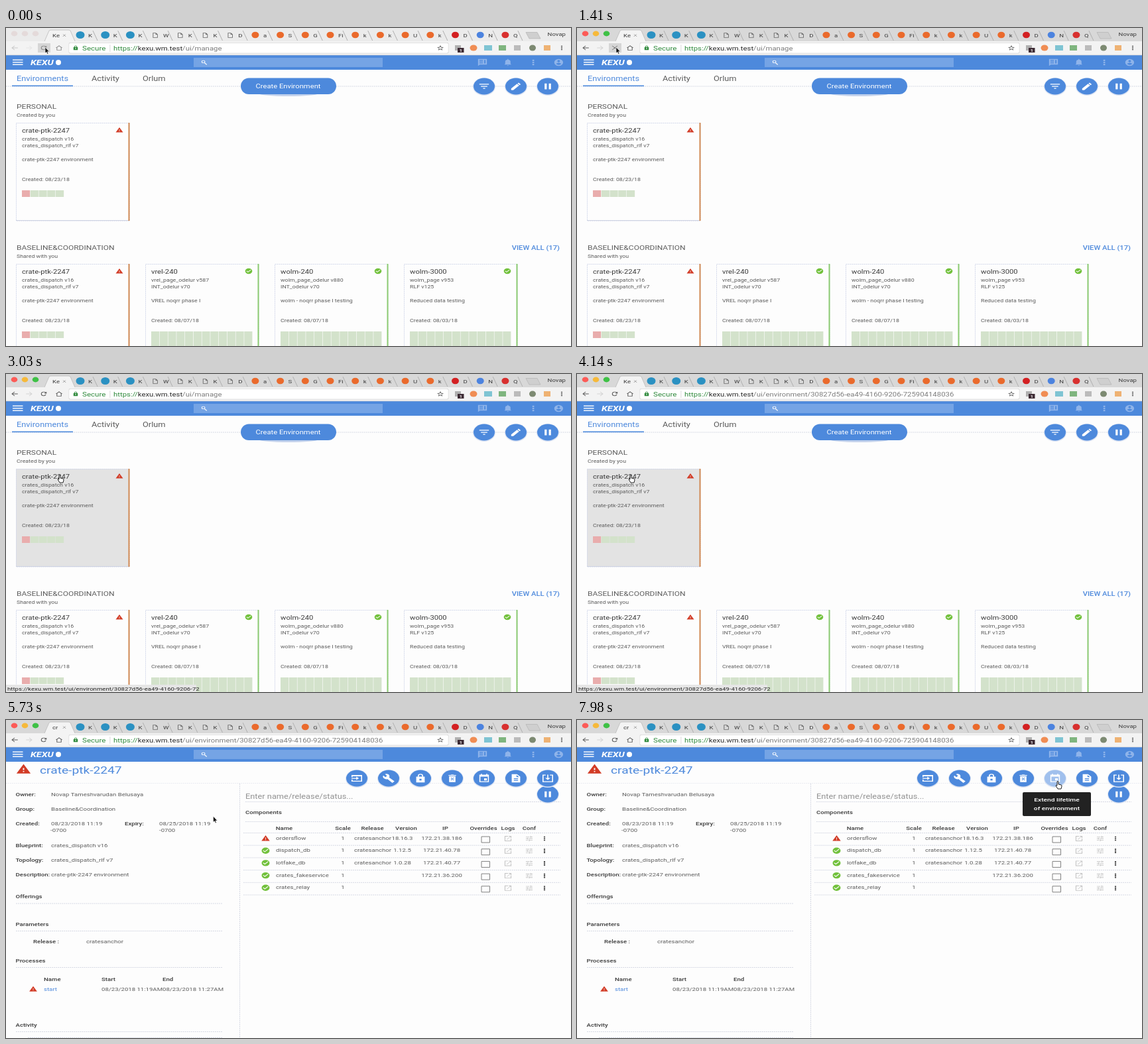
These frames come from a looping animation (852x480 px, 8000 ms). An HTML page with a canvas:

```html
<!DOCTYPE html>
<html lang="en">
<head>
<meta charset="utf-8">
<title>Environment manager</title>
<style>
html, body { margin: 0; width: 100%; height: 100%; overflow: hidden; background: #fdfdfd; }
canvas { display: block; width: 100vw; height: 100vh; }
</style>
</head>
<body>
<canvas width="852" height="480"></canvas>
<script>
const ctx = document.querySelector('canvas').getContext('2d');
const LOOP = 8000;
const SX = 0.8, SY = 0.625;
const PAGE = '#fdfdfd', BAR = '#f3f3f3', BLUE = '#4d89dc', LINE = '#d6d9e4', WHITE = '#ffffff';
const INK = '#3b3b3b', SOFT = '#5c5c5c', MUTED = '#929292', FAINT = '#c4c4c4', GREEN = '#72c13c', RED = '#d23b26';

const BASE = 'https://', HOST = 'kexu.wm.test';
const LIST_PATH = '/ui/manage';
const ENV_PATH = '/ui/environment/30827d56-ea49-4160-9206-725904148036';

const ICONS = {
  filter: 'M3 6h18v2H3zM6 11h12v2H6zM10 16h4v2h-4z',
  edit: 'M3 17v4h4L18 10l-4-4zM15 5l4 4 2-2-4-4z',
  pause: 'M6 5h4v14H6zM14 5h4v14h-4z',
  enter: 'M2 4h20v16H2v-5h2v3h16V7H4v2H2zM2 11h9V8l5 4-5 4v-3H2z',
  wrench: 'M23 19L13 10Q15 5 11 2 8 0 5 2l4 4-3 3-4-4Q0 8 3 12q3 3 7 2l9 9z',
  lock: 'M4 8h3V6Q7 1 12 1t5 5v2h3v14H4zM9 8h6V6q0-3-3-3T9 6zM10 13h4v4h-4z',
  bin: 'M6 7h12v14H6zM5 4h4l1-1h4l1 1h4v2H5zM9 11l1-1 5 6-1 1zM14 10l1 1-5 6-1-1z',
  event: 'M3 3h3V1h2v2h8V1h2v2h3v18H3zM5 8v11h14V8zM12 12h5v5h-5z',
  doc: 'M4 2h10l6 6v14H4zM8 12v2h8v-2zM8 16v2h8v-2zM13 4v5h5z',
  download: 'M2 3h6v2H4v14h16V5h-4V3h6v18H2zM11 3h2v8h4l-5 5-5-5h4z',
  warn: 'M1 21h22L12 2zM11 10h2v4h-2zM11 16h2v2h-2z',
  check: 'M2 12a10 10 0 1 0 20 0 10 10 0 1 0-20 0M5 12l1.5-1.5L10 14l7.5-7.5L19 8l-9 9z',
  search: 'M3 9a6 6 0 1 0 12 0 6 6 0 1 0-12 0M5 9a4 4 0 1 1 8 0 4 4 0 1 1-8 0M14 13l7 7-2 2-7-7z',
  open: 'M3 3h9v2H5v14h14v-7h2v9H3zM14 3h7v7h-2V6l-10 10-1-1L18 5h-4z',
  tune: 'M3 5h10v2H3zM15 3h2v2h4v2h-4v2h-2zM3 11h4V9h2v6H7v-2H3zM11 11h10v2H11zM3 17h6v2H3zM11 15h2v2h8v2h-8v2h-2z',
  more: 'M10 4h4v4h-4zM10 10h4v4h-4zM10 16h4v4h-4z',
  reload: 'M18 6l2-2v7h-7l3-3Q12 4 8 8t0 8 9-2h2Q17 20 12 20 4 20 4 12t8-8q4 0 6 2z',
  stop: 'M4 5l1-1 7 7 7-7 1 1-7 7 7 7-1 1-7-7-7 7-1-1 7-7z',
  home: 'M12 3l10 9h-3v9H5v-9H2zM12 6l-5 4v9h10v-9z',
  back: 'M21 11v2H7l6 6-2 1-8-8 8-8 2 1-6 6z',
  forward: 'M3 11v2h14l-6 6 2 1 8-8-8-8-2 1 6 6z',
  star: 'M12 2l3 7 7 .5-5.500 4.500 2 7.500-6.500-4-6.500 4 2-7.500L2 9.500 9 9zM12 7l-2 4-4 .5 3 2.500-1 4 4-2.500 4 2.500-1-4 3-2.500-4-.5z',
  file: 'M4 2h10l6 6v14H4zM6 4v16h12V9h-5V4z',
  chat: 'M2 2h20v16H6l-4 4zM5 5v2h8V5zM5 9v2h8V9zM5 13v2h8v-2zM16 5v10h3V5z',
  bell: 'M4 18l2-2v-6q0-5 5-6V2h2v2q5 1 5 6v6l2 2zM10 20h4l-2 2z',
  person: 'M2 12a10 10 0 1 0 20 0 10 10 0 1 0-20 0M9 8a3 3 0 1 0 6 0 3 3 0 1 0-6 0M6 16q6-6 12 0-6 6-12 0z'
};
for (const name in ICONS) ICONS[name] = new Path2D(ICONS[name]);

function rect(x, y, w, h, color) { ctx.fillStyle = color; ctx.fillRect(x, y, w, h); }

function text(str, x, y, size, color = SOFT, { weight = 400, align = 'left', style = '' } = {}) {
  ctx.save();
  ctx.translate(x, y + size * 0.355 * SY);
  ctx.scale(SX, SY);
  ctx.font = `${style} ${weight} ${size}px Roboto, sans-serif`;
  ctx.textAlign = align;
  ctx.fillStyle = color;
  ctx.fillText(str, 0, 0);
  const width = ctx.measureText(str).width * SX;
  ctx.restore();
  return width;
}
const bold = (str, x, y, align) => text(str, x, y, 12, INK, { weight: 500, align });

function icon(name, x, y, size, color) {
  ctx.save();
  ctx.translate(x, y);
  ctx.scale(size * SX / 24, size * SY / 24);
  ctx.translate(-12, -12);
  ctx.fillStyle = color;
  ctx.fill(ICONS[name], 'evenodd');
  ctx.restore();
}

function oval(x, y, rx, ry, color) {
  ctx.fillStyle = color;
  ctx.beginPath();
  ctx.ellipse(x, y, rx, ry, 0, 0, 7);
  ctx.fill();
}

function roundRect(x, y, w, h, r, color) {
  ctx.fillStyle = color;
  ctx.beginPath();
  ctx.roundRect(x, y, w, h, r);
  ctx.fill();
}

function path(d, fill, stroke, width = 1) {
  const p = new Path2D(d);
  if (fill) { ctx.fillStyle = fill; ctx.fill(p); }
  if (stroke) { ctx.strokeStyle = stroke; ctx.lineWidth = width; ctx.stroke(p); }
}

function dotted(x1, y1, x2, y2, color = LINE) {
  ctx.setLineDash([2, 1]);
  path(`M${x1} ${y1}L${x2} ${y2}`, null, color);
  ctx.setLineDash([]);
}

function button(name, x, y, color = BLUE) {
  oval(x, y + 0.5, 17, 13.5, '#dbe3f3');
  oval(x, y, 16, 12.5, color);
  icon(name, x, y, 24, WHITE);
}

// ---- Browser frame ----
const TAB_LABELS = 'K K K W K K D a S G Fi k k U k D N Q'.split(' ');

function tabMark(i, x) {
  if (i > 2 && i < 7) return icon('file', x, 11, 14, '#6a6a6a');
  const color = i < 3 ? '#2b91c2' : i < 15 ? '#ea6a2c' : ['#d32022', '#4c83df', '#d8302f'][i - 15];
  oval(x, 10.5, i < 3 ? 6.5 : 5.5, i < 3 ? 5.5 : 4.8, color);
}

function browser({ title, url, loading, reloadHover, focused }) {
  const strip = focused ? '#d8d8d8' : '#ebebeb';
  const iconColor = focused ? '#5c5c5c' : '#8c8c8c';
  const lights = focused ? ['#fc5b57', '#f6b93a', '#3fc146'] : ['#e4dada', '#e4dada', '#e4dada'];
  rect(0, 0, 852, 20, strip);
  lights.forEach((c, i) => oval(12.5 + 16 * i, 8.5, 4.8, 3.9, c));
  TAB_LABELS.forEach((label, i) => {
    const x = 112 + 37.7 * i;
    path(`M${x + 19} 4L${x + 26} 19`, null, '#b0b0b0');
    tabMark(i, x);
    text(label, x + 12, 11, 12, INK);
  });
  path('M784 6.500H801L806 16H789Z', '#cfcfcf', '#b4b4b4', 0.7);
  text('Novap', 844, 9, 12, INK, { align: 'right' });

  rect(0, 20, 852, 21, BAR);
  path('M58 20.500L65 4Q66 3 68 3H94Q96 3 97 4L104 20.500Z', BAR);
  path('M58 20L65 4Q66 3 68 3H94Q96 3 97 4L104 20', null, '#bcbcbc', 0.8);
  text(title, 70, 11, 12, INK);
  icon('stop', 88, 11, 9, SOFT);

  if (reloadHover) rect(48, 23, 19, 14, '#d6d6d6');
  icon('back', 13, 30, 16, focused ? iconColor : '#c9c9c9');
  icon('forward', 35, 30, 16, focused ? '#d4d4d4' : '#e6e6e6');
  icon(loading ? 'stop' : 'reload', 57, 30, 16, iconColor);
  icon('home', 80, 30, 16, iconColor);

  roundRect(94.6, 22.1, 572.8, 16.3, 2, '#d5d5d5');
  roundRect(95.2, 22.8, 571.6, 14.9, 2, WHITE);
  icon('lock', 105, 30, 12, '#2f8a3c');
  text('Secure', 115, 30.5, 14.5, '#2f8a3c');
  rect(156.5, 25, 0.8, 11, '#cfcfcf');
  let x = 162;
  x += text(BASE, x, 30.5, 14.2, '#2f8a3c');
  x += text(HOST, x, 30.5, 14.2, '#2c2c2c');
  text(url, x, 30.5, 14.2, '#7c7c7c');
  icon('star', 655, 30, 15, '#5c5c5c');

  rect(677, 26, 9, 8, '#b0b0b0');
  rect(681, 30, 9.5, 7, '#3c2a33');
  text('1', 685.7, 33.6, 9, WHITE, { align: 'center', weight: 700 });
  oval(705, 30, 5.5, 4.5, '#f08d54');
  rect(721, 26, 12, 8, '#7fc4d3');
  rect(743, 26, 11, 8, '#7fb57f');
  rect(766, 26, 10, 8, '#bbbbbb');
  oval(794, 30, 5, 4.5, '#7d8a72');
  rect(811, 26, 10, 8, '#eeb273');
  icon('more', 838, 30, 16, '#5c5c5c');
  rect(0, 40.5, 852, 0.7, '#d2d2d2');
}

function appBar() {
  rect(0, 41, 852, 22, BLUE);
  for (const y of [47.5, 51, 54.5]) rect(10, y, 15.5, 1.4, WHITE);
  text('KEXU', 37, 52, 18, WHITE, { weight: 700, style: 'italic' });
  oval(79, 52, 4, 4, WHITE);
  rect(283, 45, 285, 14, '#75a4e5');
  icon('search', 299, 52, 14, WHITE);
  ['chat', 'bell', 'more', 'person'].forEach((name, i) =>
    icon(name, 718.5 + 38.3 * i, 52, 20, '#8fb4ea'));
}

// ---- Environment list ----
const ENV = 'crate-ptk-2247';
const MINE = { title: ENV, lines: ['crates_dispatch v16', 'crates_dispatch_rlf v7'], note: ENV + ' environment', date: '08/23/18', failed: true };
const SHARED = [
  MINE,
  { title: 'vrel-240', lines: ['vrel_page_odelur v587', 'INT_odelur v70'], note: 'VREL noqrr phase I', date: '08/07/18' },
  { title: 'wolm-240', lines: ['wolm_page_odelur v880', 'INT_odelur v70'], note: 'wolm - noqrr phase I testing', date: '08/07/18' },
  { title: 'wolm-3000', lines: ['wolm_page v953', 'RLF v125'], note: 'Reduced data testing', date: '08/03/18' }
];

function card(env, x, y, hover = 0) {
  const { failed } = env;
  rect(x, y, 171, 148, PAGE);
  ctx.globalAlpha = hover;
  rect(x, y, 171, 148, '#e3e3e3');
  ctx.globalAlpha = 1;
  ctx.setLineDash([2, 1]);
  path(`M${x + .5} ${y + .5}h170.500v147.500h-170.500z`, null, '#d3d8ea');
  ctx.setLineDash([]);
  rect(x, y + 147, 171, 1, '#cdd2e2');
  rect(x + 169.5, y, 2, 148, failed ? '#d18a55' : '#8ccb72');
  const left = x + 9;
  text(env.title, left, y + 12, 14, INK);
  env.lines.forEach((line, i) => text(line, left, y + 24.5 + 10 * i, 11));
  text(env.note, left, y + 55.5, 11);
  text('Created: ' + env.date, left, y + 85.5, 11);
  icon(failed ? 'warn' : 'check', x + 156, y + 11, failed ? 15 : 16, failed ? RED : GREEN);
  const cells = failed ? 5 : 12, step = 12.75;
  for (let i = 0; i < cells; i++) {
    rect(left + step * i, y + 102, step - 0.6, failed ? 10 : 22, failed && i === 0 ? '#e9adad' : '#d3e2cb');
  }
}

function listPage(hover, showContent) {
  appBar();
  dotted(0, 88, 852, 88);
  text('Environments', 16, 76, 16, BLUE);
  text('Activity', 129, 76, 16, SOFT);
  text('Orlum', 206, 76, 16, SOFT);
  rect(9, 86.5, 92, 1.6, BLUE);
  oval(426, 99, 45, 4, '#c3d2ec');
  roundRect(354, 75.5, 144, 24.5, 14, BLUE);
  text('Create Environment', 425.5, 88, 14, WHITE, { align: 'center' });
  ['filter', 'edit', 'pause'].forEach((name, i) => button(name, 721 + 48 * i, 88));
  if (!showContent) return;
  text('PERSONAL', 16, 119, 15);
  text('Created by you', 16, 131.5, 11);
  card(MINE, 15, 143, hover);
  text('BASELINE&COORDINATION', 16, 332, 15);
  text('Shared with you', 16, 344.5, 11);
  text('VIEW ALL (17)', 835, 332, 14, BLUE, { align: 'right', weight: 500 });
  SHARED.forEach((env, i) => card(env, 15 + 195 * i, 356));
}

// ---- Environment details ----
const FIELDS = [
  ['Owner:', 112, 'Novap Tameshvarudan Belusaya'],
  ['Group:', 134, 'Baseline&Coordination'],
  ['Created:', 156, '08/23/2018 11:19'],
  ['Blueprint:', 189, 'crates_dispatch v16'],
  ['Topology:', 211, 'crates_dispatch_rlf v7'],
  ['Description:', 233.5, ENV + ' environment']
];
const COMPONENTS = [
  ['ordersflow', 'cratesanchor', '18.16.3', '172.21.38.186'],
  ['dispatch_db', 'cratesanchor', '1.12.5', '172.21.40.78'],
  ['lotfake_db', 'cratesanchor', '1.0.28', '172.21.40.77'],
  ['crates_fakeservice', '', '', '172.21.36.200'],
  ['crates_relay', '', '', '']
];
const HEADS = { Name: 419.5, Scale: 508, Release: 552.5, Version: 603.5, IP: 662.5, Overrides: 720, Logs: 757, Conf: 789 };

function detailsLeft() {
  for (const [label, y, value] of FIELDS) {
    bold(label, 14.5, y);
    text(value, 68, y, 12);
  }
  bold('Expiry:', 179, 156);
  text('08/25/2018 11:19', 231, 156, 12);
  text('-0700', 67, 166.5, 12);
  text('-0700', 231, 166.5, 12);
  [['Offerings', 266.5], ['Parameters', 308], ['Processes', 363], ['Activity', 460]].forEach(([label, y]) => {
    bold(label, 14.5, y);
    dotted(15, y + 10.5, 327, y + 10.5);
  });
  bold('Release :', 41, 334.5);
  text('cratesanchor', 121, 334.5, 12);
  bold('Name', 57, 391);
  bold('Start', 144, 391);
  bold('End', 236, 391);
  icon('warn', 41, 406, 16, RED);
  text('start', 57, 406.5, 12, BLUE);
  text('08/23/2018 11:19AM', 144, 406.5, 12);
  text('08/23/2018 11:27AM', 236, 406.5, 12);
  dotted(33, 479.5, 327, 479.5);
}

function detailsRight() {
  text('Enter name/release/status...', 361, 115, 16, MUTED);
  dotted(361, 123.5, 836, 123.5);
  bold('Components', 361, 139.5);
  dotted(361, 153.5, 836, 153.5);
  for (const label in HEADS) bold(label, HEADS[label], 163, 'center');
  COMPONENTS.forEach(([name, release, version, ip], i) => {
    const y = 178 + 18.7 * i;
    const center = { align: 'center' };
    dotted(358, y - 7.5, 836, y - 7.5);
    icon(i ? 'check' : 'warn', 391.5, y + 0.5, i ? 18 : 17, i ? GREEN : RED);
    text(name, 407, y, 12);
    text('1', 508, y, 12, SOFT, center);
    text(release, 525, y, 12);
    text(version, 597.5, y, 12, SOFT, center);
    text(ip, 657, y, 12, SOFT, center);
    path(`M717 ${y - 2}h12.500v9h-12.500z`, null, '#808080');
    icon('open', 757, y + 1, 17, FAINT);
    icon('tune', 789, y + 1, 17, FAINT);
    icon('more', 812, y + 1, 16, INK);
  });
  dotted(358, 264, 836, 264);
}

function detailsPage(buttonHover, tooltip) {
  appBar();
  icon('warn', 26.5, 74, 29, RED);
  text(ENV, 51, 75.5, 24, BLUE);
  dotted(0, 95.5, 852, 95.5, '#eaecf2');
  dotted(352.5, 96, 352.5, 480);
  detailsLeft();
  detailsRight();
  button('pause', 817, 112);
  ['enter', 'wrench', 'lock', 'bin', 'event', 'doc', 'download'].forEach((name, i) =>
    button(name, 529 + 48 * i, 88, buttonHover && name === 'event' ? '#a0c0ed' : BLUE));
  if (tooltip <= 0) return;
  ctx.globalAlpha = tooltip;
  roundRect(672, 109, 103, 36, 2, '#222222');
  const style = { align: 'center', weight: 500 };
  text('Extend lifetime', 723.5, 120, 12.8, WHITE, style);
  text('of environment', 723.5, 133, 12.8, WHITE, style);
  ctx.globalAlpha = 1;
}

// ---- Pointer ----
const MOVES = [
  [0, 59, 29], [1500, 59, 29], [2150, 163, 121], [2350, 163, 121], [2900, 82, 153],
  [4900, 82, 153], [6600, 559, 137], [6900, 559, 137], [7500, 726, 93], [LOOP, 726, 93]
];
const clamp = v => Math.max(0, Math.min(1, v));

function pointerAt(t) {
  const i = MOVES.findIndex(m => m[0] > t);
  const [t0, x0, y0] = MOVES[i - 1], [t1, x1, y1] = MOVES[i];
  const p = (t - t0) / (t1 - t0), e = p * p * (3 - 2 * p);
  return [x0 + (x1 - x0) * e, y0 + (y1 - y0) * e];
}

function pointer(x, y, kind) {
  ctx.save();
  ctx.translate(x, y);
  if (kind === 'hand') path('M-2 0Q-1-1 0 0V4L4 5Q5 5 5 7L4 11H-1L-4 6Q-4 5-2 6Z', WHITE, '#222');
  else if (kind === 'beam') path('M-2.500-3.500Q0-3.500 0-2Q0-3.500 2.500-3.500M0-2V5M-2.500 6Q0 6 0 5Q0 6 2.500 6M-1.500 2H1.500', null, '#222');
  else path('M0 0V9L2 7.300 3.300 10.300 4.800 9.700 3.500 6.700H6.200Z', '#111', WHITE, 0.6);
  ctx.restore();
}

// ---- Timeline ----
function draw(t) {
  const blank = t >= 360 && t < 1200;
  const details = t >= 4380;
  const [x, y] = pointerAt(t);
  const overCard = !details && t > 2000 && x < 187 && y > 143;
  const overButton = details && Math.hypot((x - 721) / 16, (y - 88) / 12.5) < 1;

  rect(0, 0, 852, 480, PAGE);
  if (details) detailsPage(overButton, clamp((t - 7560) / 150));
  else if (!blank) listPage(overCard ? clamp((t - 2700) / 150) : 0, t < 360 || t >= 1380);
  browser({
    title: details ? 'cr' : 'Ke',
    url: t >= 4080 ? ENV_PATH : LIST_PATH,
    loading: t >= 300 && t < 1440,
    reloadHover: y < 38,
    focused: t >= 240
  });
  if (overCard) {
    rect(0, 469, 287, 11, '#e6e6e6');
    text(BASE + HOST + ENV_PATH.slice(0, -10), 2, 475, 12, '#222');
  }
  const overText = details && x < 200;
  pointer(x, y, overCard || overButton ? 'hand' : overText ? 'beam' : 'arrow');
}

function frame(now) {
  draw(now % LOOP);
  requestAnimationFrame(frame);
}
requestAnimationFrame(frame);
</script>
</body>
</html>
```
